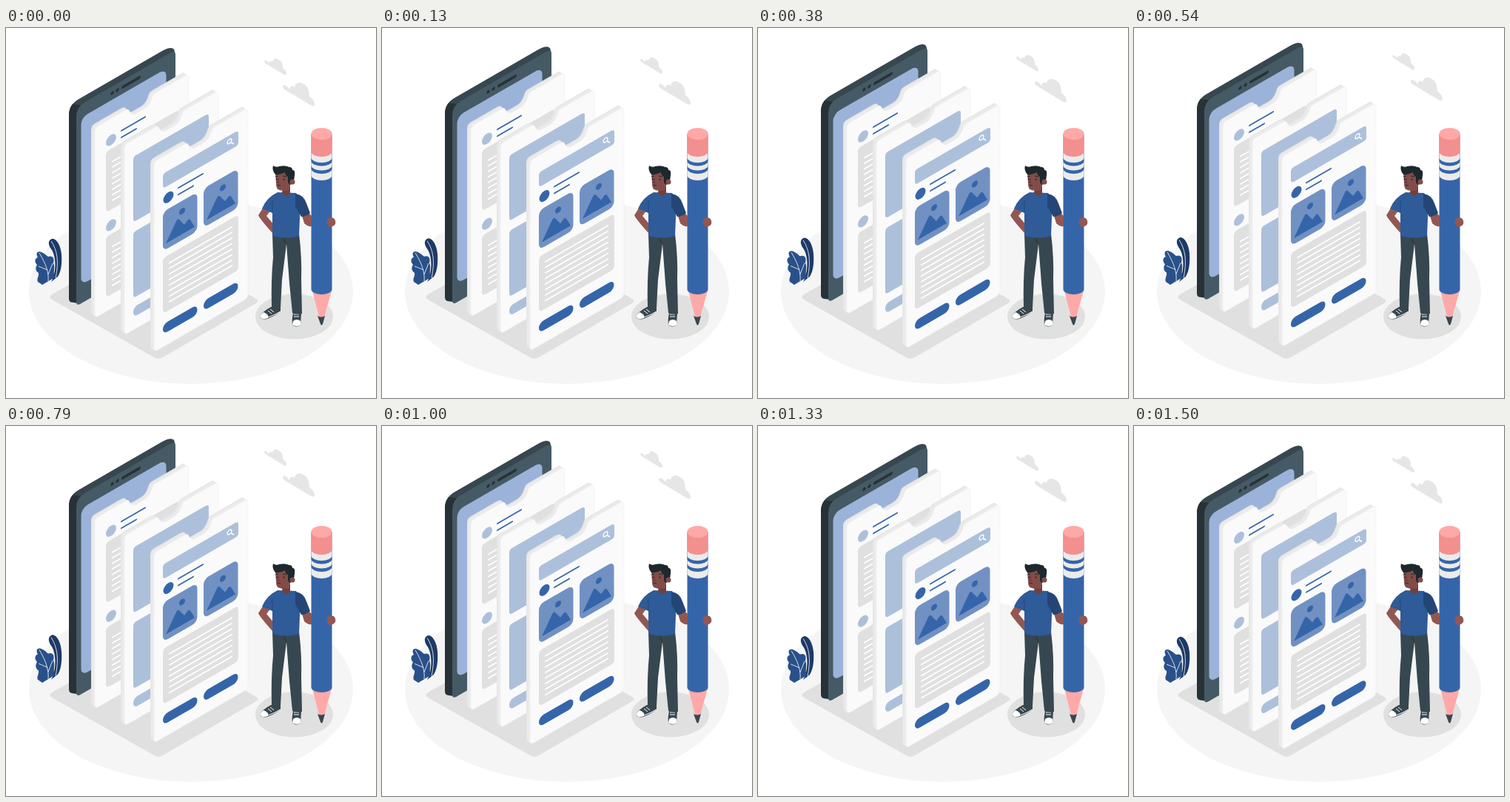
An HTML page that plays this animation: 500 px wide and 500 px high, repeating every 1540 ms.

```html
<!DOCTYPE html>
<html lang="en">
<head>
<meta charset="utf-8">
<title>Floating app screens</title>
<style>
html, body { margin: 0; width: 100%; height: 100%; overflow: hidden; background: #fff; }
svg { display: block; width: 100vw; height: 100vh; }
</style>
</head>
<body>
<svg viewBox="0 0 500 500">
  <defs>
    <path id="sheet" d="M0 187q0-6 5-6H40c5 0 6 2 7 5 2 5 5 8 10 8H67c5 0 8-3 10-8 1-3 2-5 6-5H122q5 0 5 6V432q0 6-5 6H5q-5 0-5-6Z"/>
    <g id="card">
      <use href="#sheet" x="-5" y="-6" fill="#e6e6e6"/>
      <use href="#sheet" x="-3.5" y="-4" fill="#ebebeb"/>
      <use href="#sheet" x="-2" y="-2" fill="#ebebeb"/>
      <use href="#sheet" fill="#fafafa" stroke="#f0f0f0" stroke-width=".6"/>
    </g>
    <g id="photo">
      <rect width="46.5" height="53" rx="7" fill="#7191c3"/>
      <path d="M4 45 18 23q2-3 4 0L29 34 33 31q2-2 4 1L43 45Z" fill="#3565a9"/>
      <circle cx="26" cy="14" r="4" fill="#3565a9"/>
    </g>
    <path id="cloud" d="M374 79c0-4 7-1 9 4 0-4 4-6 7-3 1-7 8-8 12-4 5 1 8 8 8 17 5 2 7 8 7 10q0 3-4 2L378 84q-4-2-4-5Z"/>
  </defs>

  <ellipse cx="250" cy="356" rx="219" ry="125" fill="#f5f5f5"/>
  <path d="M62 360 190 288q6-4 12 0L338 366q5 3 0 6L212 445q-6 4-12 0L62 367q-5-3 0-7Z" fill="#e0e0e0"/>
  <ellipse cx="389.500" cy="390" rx="52.500" ry="30.500" fill="#e0e0e0"/>

  <g id="plant">
    <path d="M61 343C67 334 69 312 62 300 58 295 56 289 60 286 66 281 74 292 75 306 76 320 74 330 70 336Z" fill="#1d3a66"/>
    <path d="M61 288C69 300 72 315 67 338" fill="none" stroke="#fff" stroke-width=".8"/>
    <path d="M49 347 43 343C41 339 45 335 44 331 39 328 40 323 42 320 38 316 39 311 43 310 39 303 44 300 50 304 54 306 55 308 57 309 63 307 66 311 64 318 67 324 63 330 66 337Z" fill="#29508a"/>
    <path d="M45 304C54 319 58 330 57 342M56 327 44 322M57 333 63 318" fill="none" stroke="#fff" stroke-width=".8"/>
  </g>

  <g id="clouds" fill="#e6e6e6">
    <use href="#cloud"/>
    <use href="#cloud" transform="translate(88.4 -10) scale(.697)"/>
  </g>

  <g id="float">
    <g transform="matrix(1 -.577 0 1 95 0)">
      <path d="M-10 112q0-14 13-14H116q12 0 16 7l2 8H4Z" fill="#37474f"/>
      <path d="M-10 112q0-9 5-12L6 108V376L-5 368q-5-3-5-8Z" fill="#263238"/>
      <path d="M0 120q0-13 12-13H126q8 0 8 8V370q0 6-6 6H6q-6 0-6-6Z" fill="#455a64"/>
      <rect x="6.500" y="125" width="115" height="226" rx="9" fill="#9cb3d9"/>
      <circle cx="48.500" cy="116" r="2.200" fill="#263238"/>
      <circle cx="55.500" cy="116" r="2.200" fill="#263238"/>
      <path d="M63 116H85" stroke="#263238" stroke-width="4" stroke-linecap="round"/>
    </g>
    <g transform="matrix(1 -.577 0 1 120 -46)">
      <use href="#card"/>
      <g id="feed"></g>
    </g>
    <g transform="matrix(1 -.577 0 1 160 -23)" fill="#adc0db">
      <use href="#card"/>
      <rect x="12" y="204" width="102" height="88.500" rx="4"/>
      <rect x="12" y="306" width="102" height="89" rx="4"/>
      <rect x="12" y="407.500" width="46" height="13.500" rx="6"/>
    </g>
    <g transform="matrix(1 -.577 0 1 200 0)">
      <use href="#card"/>
      <rect x="12" y="204" width="102" height="20" rx="4" fill="#adc0db"/>
      <g fill="none" stroke="#fff" stroke-width="1.400"><circle cx="102" cy="212" r="2.900"/><path d="M104 214.500 108 219"/></g>
      <circle cx="19.500" cy="240" r="7" fill="#3565a9"/>
      <path d="M33 235H66M33 244H53" stroke="#3565a9" stroke-width="2" stroke-linecap="round"/>
      <use href="#photo" x="12" y="255.500"/>
      <use href="#photo" x="67" y="255.500"/>
      <g id="article"></g>
      <g fill="#3565a9"><rect x="12" y="407.500" width="46.500" height="13.500" rx="6.500"/><rect x="67" y="407.500" width="46.500" height="13.500" rx="6.500"/></g>
    </g>
  </g>

  <g id="pencil">
    <path d="M414 355 425 398q1.500 4 3 0L440 355Z" fill="#ffa8a8"/>
    <path d="M421 389q5 3 10 0L428 400q-1.500 3-3 0Z" fill="#37474f"/>
  </g>

  <g id="person">
    <path d="M358 377Q345 384 343 390 345 395 353 393 362 390 371 383V376Z" fill="#37474f"/>
    <path d="M348 384q-4 3-5 6 3 5 11 2 2-5-6-8Z" fill="#fff"/>
    <path d="M345 392q9 1 26-9" fill="none" stroke="#fff"/>
    <path d="M388 385Q386 395 387 401 392 406 398 401L399 385Z" fill="#37474f"/>
    <path d="M388 396q5-4 10 0v5q-5 4-11 0Z" fill="#fff"/>
    <path d="M354 382l5 4m-2-6 5 4m27 3h7m-7 3h7" stroke="#fff" stroke-width="1"/>
    <path d="M360 278H396Q400 310 399 340L400 386Q393 388 387 385L383 345 379 292 373 340 371 378Q364 380 359 377 358 340 361 310Z" fill="#37474f"/>
    <path d="M379 292 375 284" stroke="#263238"/>
    <path d="M348 242 341 253Q343 258 360 277L363 267 352 254 358 246Z" fill="#935752"/>
    <path d="M399 251Q402 260 403 264 408 269 413 268V254L409 250Z" fill="#935752"/>
    <path d="M367 222 392 223 398 232 396 281Q378 286 360 281L360 250 346 244Q352 229 367 222Z" fill="#2f5b98"/>
    <path d="M391 224Q402 225 406 237L411 250Q406 255 399 255L391 241Z" fill="#234677"/>
    <path d="M360 233V250" stroke="#234677" stroke-width=".8"/>
    <path d="M374 214H384V224Q379 231 373 223Z" fill="#70403f"/>
    <path d="M364 195Q374 192 384 197 389 203 387 210L384 212 383 219Q376 221 370 219 365 218 365 211Z" fill="#834c48"/>
    <path d="M364 198Q359 192 361 186 365 189 369 187 377 185 383 188 387 188 387 192 391 191 390 199 390 204 388 207L384 212 381 209 381 201Q377 199 377 195 370 199 364 198Z" fill="#1c282d"/>
    <circle cx="387" cy="208" r="3.500" fill="#834c48"/>
    <path d="M364 201l4-1m6 0 5 1M367 212l4 1" stroke="#1c282d" stroke-width="1"/>
    <path d="M369 203l-2 6 3 0" fill="none" stroke="#5e3130" stroke-width=".8"/>
    <circle cx="366" cy="204.500" r="1.100" fill="#1c282d"/><circle cx="375.500" cy="204.500" r="1.100" fill="#1c282d"/>
    <path d="M434 258q3-3 9-1 3 3 2 8-3 4-8 4-4-3-3-11Z" fill="#935752"/>
  </g>
</svg>
<script>
const LOOP = 1540, RISE = 10;
const get = id => document.getElementById(id);

// Grey paragraph with white text lines
function paragraph(x, y, width, height, firstLine) {
  let lines = "";
  for (let i = 0; i < 8; i++) lines += `M${x + 9} ${firstLine + i * 7.5}H${x + width - 9}`;
  return `<rect x="${x}" y="${y}" width="${width}" height="${height}" rx="5" fill="#e0e0e0"/>
    <path d="${lines}" stroke="#fff" stroke-width="2" stroke-linecap="round"/>`;
}

get("article").innerHTML = paragraph(12, 318, 102, 75, 329.5);

get("feed").innerHTML = [0, 115].map(dy => `<g transform="translate(0 ${dy})">
  <circle cx="22" cy="210" r="7" fill="#adc0db"/>
  <path d="M36 205.500H68M36 214.500H56" stroke="#3565a9" stroke-width="2" stroke-linecap="round"/>
  ${paragraph(15, 222, 99, 82, 240)}</g>`).join("");

// Each band overlaps the one below it, ending in a curved rim
const bands = [[353, "#3565a9"], [199, "#ebebeb"], [190, "#3565a9"], [185.5, "#ebebeb"],
  [179.5, "#3565a9"], [175, "#ebebeb"], [167, "#f28f8f"]];
get("pencil").innerHTML += bands.map(([end, color]) =>
  `<path d="M412.500 143V${end}a14 7 0 0 0 28 0V143Z" fill="${color}"/>`).join("") +
  `<ellipse cx="426.500" cy="143" rx="14" ry="8" fill="#ffa8a8"/>`;

function draw(now) {
  const phase = now % LOOP / LOOP;
  const lift = 1 - Math.abs(2 * phase - 1);
  const up = `translate(0 ${-RISE * lift})`;
  get("float").setAttribute("transform", up);
  get("clouds").setAttribute("transform", up);
  // The plant stretches upward from its base
  get("plant").setAttribute("transform", `translate(0 347) scale(1 ${1 + .04 * lift}) translate(0 -347)`);
  requestAnimationFrame(draw);
}
requestAnimationFrame(draw);
</script>
</body>
</html>
```
